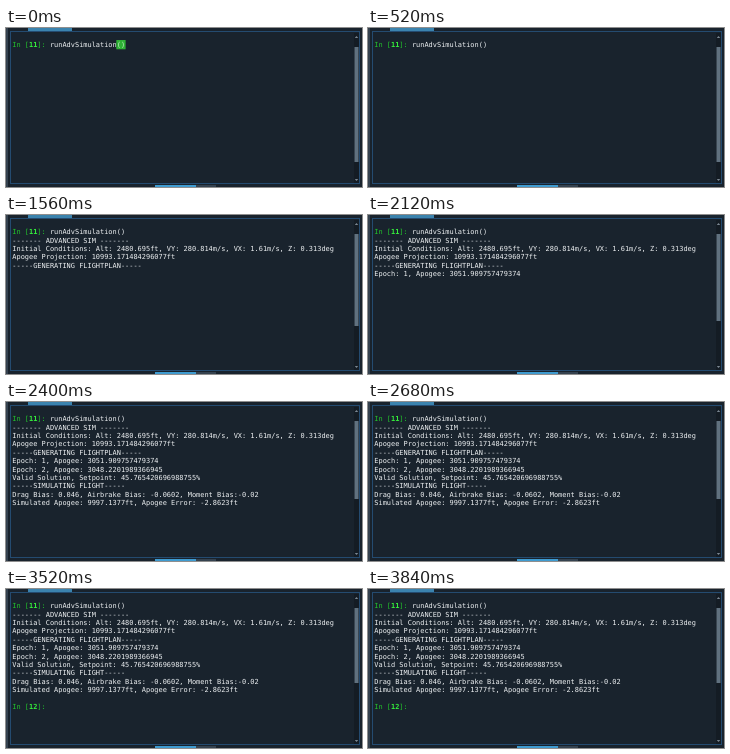
Animation, 356 px wide and 159 px high, one loop 3.88 s. Source, as an HTML page with a canvas:

```html
<!DOCTYPE html>
<html lang="en">
<head>
<meta charset="utf-8">
<title>Console run</title>
<style>
html, body { margin: 0; width: 100%; height: 100%; overflow: hidden; background: #19232d; }
canvas { display: block; }
</style>
</head>
<body>
<canvas id="stage" width="356" height="159"></canvas>
<script>
const ctx = document.getElementById('stage').getContext('2d');
const LOOP = 3880, LEFT = 6.3, BASE = 19.4, LINE = 8.35, SIZE = 6.95;
const GREEN = '#22c62c', WHITE = '#eef1f3', LIME = '#35ef3c';

// Console output and the time each line is printed
const output = [
  [1080, '------- ADVANCED SIM -------'],
  [1080, 'Initial Conditions: Alt: 2480.695ft, VY: 280.814m/s, VX: 1.61m/s, Z: 0.313deg'],
  [1080, 'Apogee Projection: 10993.171484296077ft'],
  [1160, '-----GENERATING FLIGHTPLAN-----'],
  [1840, 'Epoch: 1, Apogee: 3051.909757479374'],
  [2320, 'Epoch: 2, Apogee: 3048.2201989366945'],
  [2320, 'Valid Solution, Setpoint: 45.765420696988755%'],
  [2320, '-----SIMULATING FLIGHT-----'],
  [2360, 'Drag Bias: 0.046, Airbrake Bias: -0.0602, Moment Bias:-0.02'],
  [2360, 'Simulated Apogee: 9997.1377ft, Apogee Error: -2.8623ft']
];
// Bottom of the scroll handle as the document grows
const handleSteps = [[0, 134], [1080, 120], [1160, 111], [1840, 106], [2320, 97], [2880, 94]];

function rect(color, x, y, w, h) {
  ctx.fillStyle = color;
  ctx.fillRect(x, y, w, h);
}

function write(text, x, row, color, bold) {
  ctx.font = `${bold ? 'bold ' : ''}${SIZE}px "DejaVu Sans Mono", monospace`;
  ctx.fillStyle = color;
  ctx.fillText(text, x, BASE + row * LINE);
  return x + ctx.measureText(text).width;
}

function prompt(number, row) {
  let x = write('In [', LEFT, row, GREEN);
  x = write(number, x, row, LIME, true);
  return write(']: ', x, row, GREEN);
}

function arrow(y, dir) {
  ctx.fillStyle = '#7b8792';
  ctx.beginPath();
  ctx.moveTo(348.8, y);
  ctx.lineTo(352.2, y);
  ctx.lineTo(350.5, y + dir * 2);
  ctx.fill();
}

function frame(t) {
  rect('#19232d', 0, 0, 356, 159);
  rect('#35424f', 0, 0, 2, 159);
  rect('#3b83ae', 22, 0, 44, 3);
  rect('#3f9bd0', 149, 157, 41, 2);
  rect('#35424f', 190, 157, 20, 2);
  ctx.strokeStyle = '#244b70';
  ctx.lineWidth = 1;
  ctx.strokeRect(4.5, 3.5, 349, 152);
}

function scrollbar(t) {
  const bottom = handleSteps.filter(s => t >= s[0]).pop()[1];
  rect('#141c24', 348, 5, 5, 150);
  rect('#60717f', 348.5, 19, 4, bottom - 19);
  arrow(10, -1);
  arrow(151, 1);
}

function draw(t) {
  frame(t);
  scrollbar(t);
  const x = write('runAdvSimulation', prompt('11', 0), 0, WHITE);
  const matched = t < 280;
  if (matched) rect('#2eb135', x - 0.4, 12, 9.3, 9.3);
  write('()', x, 0, matched ? '#c3efc5' : WHITE);
  output.forEach(([at, text], i) => {
    if (t >= at) write(text, LEFT, i + 1, WHITE);
  });
  if (t >= 2880) {
    const end = prompt('12', 12);
    if (t < 3440) rect('#d5dadd', end - 0.3, 112.5, 0.8, 8.5);
  }
}

ctx.textRendering = 'geometricPrecision';
function tick() {
  draw(performance.now() % LOOP);
  requestAnimationFrame(tick);
}
tick();
</script>
</body>
</html>
```
